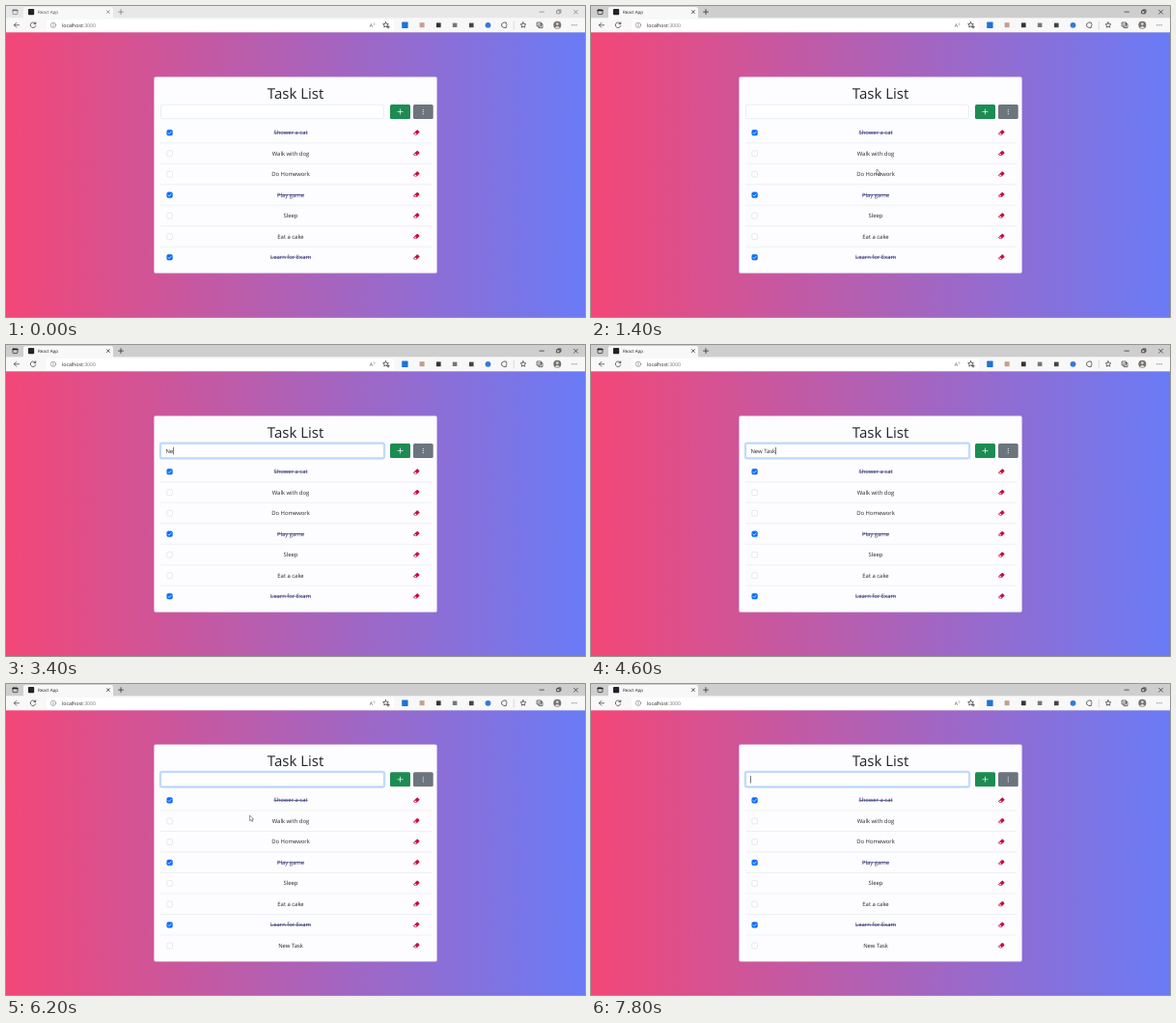
An HTML page that plays this animation: 600x322 px, repeating every 8 s.

```html
<!DOCTYPE html>
<html lang="en">
<head>
<meta charset="utf-8">
<title>Task List</title>
<style>
html, body { margin: 0; width: 100%; height: 100%; overflow: hidden; }
svg { display: block; width: 100vw; height: 100vh; }
text { font-family: "Open Sans", "Noto Sans", sans-serif; text-rendering: geometricPrecision; }
.line { fill: none; stroke-width: .7; stroke-linecap: round; stroke-linejoin: round; }
.done { fill: #2c2d70; text-decoration: line-through; }
</style>
</head>
<body>
<svg id="stage" viewBox="0 0 600 322">
  <defs>
    <linearGradient id="sky">
      <stop offset="0" stop-color="#f34777"/>
      <stop offset="1" stop-color="#697bf6"/>
    </linearGradient>
    <g id="eraser">
      <path d="M-3.2 .9 L.5 -2.5 Q.9 -2.8 1.4 -2.5 L3 -1 Q3.4 -.5 3 0 L.3 2.6 L-1.8 2.6 L-3.2 1.5 Z" fill="#c80d3c"/>
      <path d="M-2.3 1.2 L-1.3 .3 L.3 1.8 L-1.5 1.9 Z" fill="#fff"/>
    </g>
  </defs>
  <rect y="27" width="600" height="295" fill="url(#sky)"/>

  <g id="browser">
    <rect id="strip" width="600" height="14"/>
    <path d="M18 13 V3 Q18 1 20 1 H109 Q111 1 111 3 V13 Z" fill="#f8f8f8"/>
    <rect y="12.3" width="600" height="15" fill="#f8f8f8"/>
    <rect x="42" y="14" width="360" height="11.8" rx="2" fill="#fff"/>
    <g id="tabIcons" class="line" stroke="#222">
      <rect x="7" y="3.8" width="5" height="4.8" rx=".8"/>
      <path d="M7 4.6 H12" stroke-width="1.3"/>
      <path d="M104.4 4.6 l3 3 m0 -3 l-3 3 M116.5 6.1 h5 m-2.5 -2.5 v5"/>
      <path d="M553 6.1 h4.4 M571 4.8 h3 v3 h-3 z M572 4.8 v-.9 h3 v3 h-.9 M588.5 4.2 l4 4 m0 -4 l-4 4"/>
    </g>
    <rect x="23" y="3" width="6.2" height="6.2" rx=".8" fill="#20232a"/>
    <text id="tabName" x="33" y="7.9" font-size="4.5">React App</text>

    <g class="line" stroke="#333">
      <path d="M13.6 19.8 H8.4 m2.4 -2.4 l-2.4 2.4 l2.4 2.4"/>
      <path d="M30.6 18.4 A2.8 2.8 0 1 0 30.8 20.6 M30.8 16.8 v1.8 h-1.8"/>
      <g stroke="#666">
        <circle cx="49" cy="19.8" r="2.7" stroke-width=".5"/>
        <path d="M49 19.6 v1.5 M49 18.3 v.1" stroke-width=".6"/>
        <path d="M381.5 17.6 q1 1 0 2" stroke-width=".5"/>
      </g>
      <g id="stars"></g>
      <path d="M394.8 21.8 h2.6 m-1.3 -1.3 v2.6"/>
      <path d="M514 18.2 l2 -1.2 h2.3 v1.5 q1.6 1.2 0 2.4 v1.6 h-2.3 l-2 -1.2 z"/>
      <path d="M526.3 16 v8" stroke="#bbb" stroke-width=".5"/>
      <path d="M550.5 17 h4 v4 h-4 z M552 21 v1.6 h4 v-4 h-1.5 M551.5 19 h2"/>
    </g>
    <text x="376.8" y="22" font-size="5.2" fill="#555">A</text>
    <text x="58" y="21.8" font-size="5.2" fill="#222">localhost<tspan fill="#777">:3000</tspan></text>
    <rect x="410.2" y="16.6" width="6.4" height="6.4" rx=".6" fill="#1d74d8"/>
    <rect x="428.6" y="17.2" width="5" height="5" fill="#c2a08e"/>
    <rect x="446" y="17.4" width="4.6" height="4.8" fill="#333"/>
    <rect x="462.8" y="17.6" width="4.6" height="4.4" fill="#777"/>
    <rect x="480" y="17.6" width="4.6" height="4.6" fill="#444"/>
    <circle cx="499.5" cy="19.8" r="2.9" fill="#3478d8"/>
    <circle cx="571.3" cy="19.8" r="4" fill="#77716d"/>
    <circle cx="571.3" cy="18.6" r="1.4" fill="#d6d3d0"/>
    <path d="M568.8 22.5 q2.5 -3.4 5 0 q-2.5 1.8 -5 0z" fill="#d6d3d0"/>
    <path d="M586.8 19.8 h.01 m2.1 0 h.01 m2.1 0 h.01" class="line" stroke="#333" style="stroke-width:1"/>
  </g>

  <rect id="card" x="153.5" width="293" rx="1.6" fill="#fdfdff" stroke="#d9cfe8" stroke-width=".4"/>
  <g id="body">
    <text x="300" y="95.6" font-size="15" font-weight="500" text-anchor="middle" fill="#212529">Task List</text>
    <rect id="ring" x="159.6" y="101.4" width="232.8" height="16.2" rx="2.2" fill="none" stroke="#c2dbfe" stroke-width="1.7"/>
    <rect id="field" x="160.6" y="102.3" width="230.8" height="14.4" rx="1.4" fill="#fff" stroke-width=".5"/>
    <text id="entry" x="165.4" y="111.8" font-size="5.9" fill="#212529"></text>
    <rect id="caret" y="105.8" width=".6" height="7.6" fill="#222"/>
    <rect x="398" y="102" width="21" height="15" rx="1.5" fill="#1d8c52"/>
    <path d="M406 109.5 h5 m-2.5 -2.5 v5" class="line" stroke="#fff"/>
    <rect x="422" y="102" width="20.7" height="15" rx="1.5" fill="#6c757d"/>
    <path d="M432.3 107.5 v.01 m0 2 v.01 m0 2 v.01" class="line" stroke="#fff" style="stroke-width:1.2"/>
    <g id="list"></g>
  </g>

  <path id="cursor" d="M0 0 V5.6 L1.3 4.5 L2.2 6.5 L3.1 6.1 L2.3 4.1 H4 Z" fill="#fff" stroke="#222" stroke-width=".45"/>
</svg>
<script>
const LOOP = 8000, STEP = 200, ROW = 21.5;
const ENTRY = "New Task";
const TASKS = [
  ["Shower a cat", true], ["Walk with dog"], ["Do Homework"], ["Play game", true],
  ["Sleep"], ["Eat a cake"], ["Learn for Exam", true], [ENTRY]
];
// Pointer trips: [time, x, y]; the pointer is hidden from each trip's last time on
const TRIPS = [
  [[800, 391, 283], [1200, 338, 218], [1600, 254, 120], [1800, 240, 110]],
  [[5800, 240, 108], [6200, 252.6, 136], [6800, 376, 283], [7200, 434, 262], [7600, 300, 112], [7800, 250, 100]]
];
const $ = id => document.getElementById(id);
const set = (id, attrs) => {
  for (const k in attrs) $(id).setAttribute(k, attrs[k]);
};
const show = (id, on) => set(id, { visibility: on ? "visible" : "hidden" });

function star(cx, cy, r) {
  const points = Array.from({ length: 10 }, (_, i) => {
    const a = i * Math.PI / 5 - Math.PI / 2, d = i % 2 ? r * .48 : r;
    return [cx + d * Math.cos(a), cy + d * Math.sin(a)].map(v => v.toFixed(2));
  });
  return `<polygon points="${points.join(" ")}"/>`;
}

function row([name, done], i) {
  const y = 131 + i * ROW;
  const box = done ? 'fill="#0d6efd" stroke="#0d6efd"' : 'fill="#fff" stroke="#c9ced4"';
  const tick = done ? `<path d="M168 ${y + .4} l1.1 1.1 l2 -2.3" class="line" stroke="#fff"/>` : "";
  const rule = i ? `<path d="M160 ${y - ROW / 2} H441" stroke="#dee2e6" stroke-width=".5"/>` : "";
  return `<g id="row${i}">${rule}
    <rect x="166.7" y="${y - 2.7}" width="5.8" height="5.8" rx="1.5" stroke-width=".45" ${box}/>${tick}
    <text x="295" y="${y + 2.1}" font-size="5.9" text-anchor="middle" ${done ? 'class="done"' : 'fill="#212529"'}>${name}</text>
    <use href="#eraser" x="425.3" y="${y}"/></g>`;
}

function pointer(t) {
  const trip = TRIPS.find(p => t >= p[0][0] && t < p[p.length - 1][0]);
  if (!trip) return null;
  const i = trip.findIndex(p => p[0] > t);
  const [t0, x0, y0] = trip[i - 1], [t1, x1, y1] = trip[i];
  const k = (t - t0) / (t1 - t0);
  return [x0 + (x1 - x0) * k, y0 + (y1 - y0) * k];
}

function render(now) {
  const t = Math.floor(now % LOOP / STEP) * STEP;
  const active = t >= 800, focused = t >= 1800, added = t >= 5200;
  const typing = t >= 3200 && !added;

  set("strip", { fill: active ? "#cecece" : "#e8e8e8" });
  set("tabIcons", { stroke: active ? "#222" : "#777" });
  set("tabName", { fill: active ? "#222" : "#555" });

  const lift = added ? ROW / 2 : 0;
  set("card", { y: 73.4 - lift, height: 203.2 + lift * 2 });
  set("body", { transform: `translate(0 ${-lift})` });
  show("row7", added);

  show("ring", focused);
  set("field", { stroke: focused ? "#86b7fe" : "#cfe0e4" });
  const text = typing ? ENTRY.slice(0, (t - 3200) / STEP + 1) : "";
  const entry = $("entry");
  if (entry.textContent !== text) entry.textContent = text;
  set("caret", { x: 165.4 + (text ? entry.getComputedTextLength() : 0) });
  show("caret", focused && (typing || (t - 1800) % 1000 < 400));

  const at = pointer(t);
  show("cursor", at);
  if (at) set("cursor", { transform: `translate(${at})` });
}

$("entry").style.whiteSpace = "pre";
$("stars").innerHTML = star(393.5, 19.6, 3) + star(536, 19.8, 3);
$("list").innerHTML = TASKS.map(row).join("");

let start;
function tick(now) {
  start ??= now;
  render(now - start);
  requestAnimationFrame(tick);
}
render(0);
requestAnimationFrame(tick);
</script>
</body>
</html>
```
